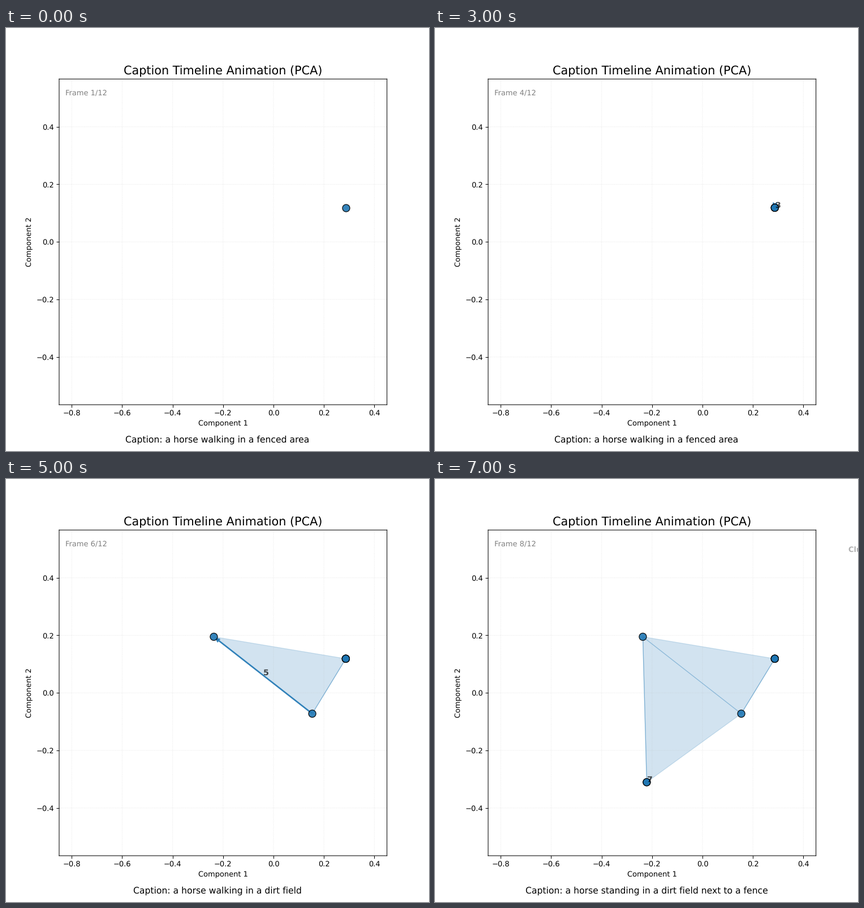
These frames come from a looping animation (748 px wide and 748 px high, 8 s). A matplotlib script:

```python
import matplotlib.pyplot as plt
from matplotlib.animation import FuncAnimation

BLUE = "#1f77b4"
FRAMES, TOTAL = 8, 12

# The first four points coincide; the tiny offsets only set the arrow direction.
EPS = 1e-9
HOME = (0.2868, 0.1187)
POINTS = [(HOME[0], HOME[1] + k * EPS) for k in (0, 1, 0, -1)]
POINTS += [(0.1538, -0.0723), (-0.2366, 0.1950), (-0.2211, -0.3105), (-0.2211, -0.3105)]

CAPTIONS = (
    ["a horse walking in a fenced area"] * 4
    + ["a horse running in a fenced area", "a horse walking in a dirt field"]
    + ["a horse standing in a dirt field next to a fence"] * 2
)

# Soft, unsnapped lines and glyphs.
plt.rcParams.update({"path.snap": False, "text.hinting": "none"})

fig, ax = plt.subplots(figsize=(8, 8), dpi=93.5)
fig.subplots_adjust(left=100.5 / 800, right=720.5 / 800,
                    bottom=87.5 / 800, top=703.5 / 800)
ax.set_xlim(-0.85, 0.45)
ax.set_ylim(-0.566, 0.566)
ax.autoscale(False)
ax.set_title("Caption Timeline Animation (PCA)", fontsize=16)
ax.set_xlabel("Component 1")
ax.set_ylabel("Component 2")
ax.grid(True, linestyle=":", alpha=0.3)

counter = ax.text(0.019, 0.95, "", transform=ax.transAxes, color="gray")
caption = fig.text(0.5, 0.02, "", ha="center", fontsize=12)
cluster = fig.text(731 / 748, 1 - 129.5 / 748, "Cluster 1", color="gray",
                   alpha=0.6, weight="bold")
drawn = []


def draw_hull(step):
    if step < 5:
        return
    corners = [3, 4, 5] if step == 5 else [3, 4, 6, 5]
    xs, ys = zip(*(POINTS[k] for k in corners))
    drawn.extend(ax.fill(xs, ys, color=BLUE, alpha=0.2, lw=1, zorder=1))


def draw_past(step):
    for a, b in zip(POINTS[:step - 1], POINTS[1:step]):
        drawn.extend(ax.plot(*zip(a, b), color=BLUE, lw=1, alpha=0.4, zorder=2))


def draw_arrow(step):
    a, b = POINTS[step - 1], POINTS[step]
    if a != b:
        style = dict(arrowstyle="->", color=BLUE, lw=2, alpha=0.9)
        drawn.append(ax.annotate("", xy=b, xytext=a, arrowprops=style, zorder=2.5))
    mid = [(u + v) / 2 for u, v in zip(a, b)]
    drawn.append(ax.text(*mid, str(step), fontsize=11, weight="bold",
                         color="black", alpha=0.7, zorder=4))


def update(step):
    while drawn:
        drawn.pop().remove()
    counter.set_text(f"Frame {step + 1}/{TOTAL}")
    caption.set_text("Caption: " + CAPTIONS[step])
    cluster.set_visible(step >= 6)

    draw_hull(step)
    if step:
        draw_past(step)
        draw_arrow(step)
    xs, ys = zip(*POINTS[:step + 1])
    drawn.append(ax.scatter(xs, ys, s=100, c=[BLUE] * len(xs), edgecolors="black",
                            linewidths=1, alpha=0.9, zorder=3))
    return drawn


anim = FuncAnimation(fig, update, frames=FRAMES, interval=1000,
                     repeat=True, repeat_delay=0)
plt.show()
```
